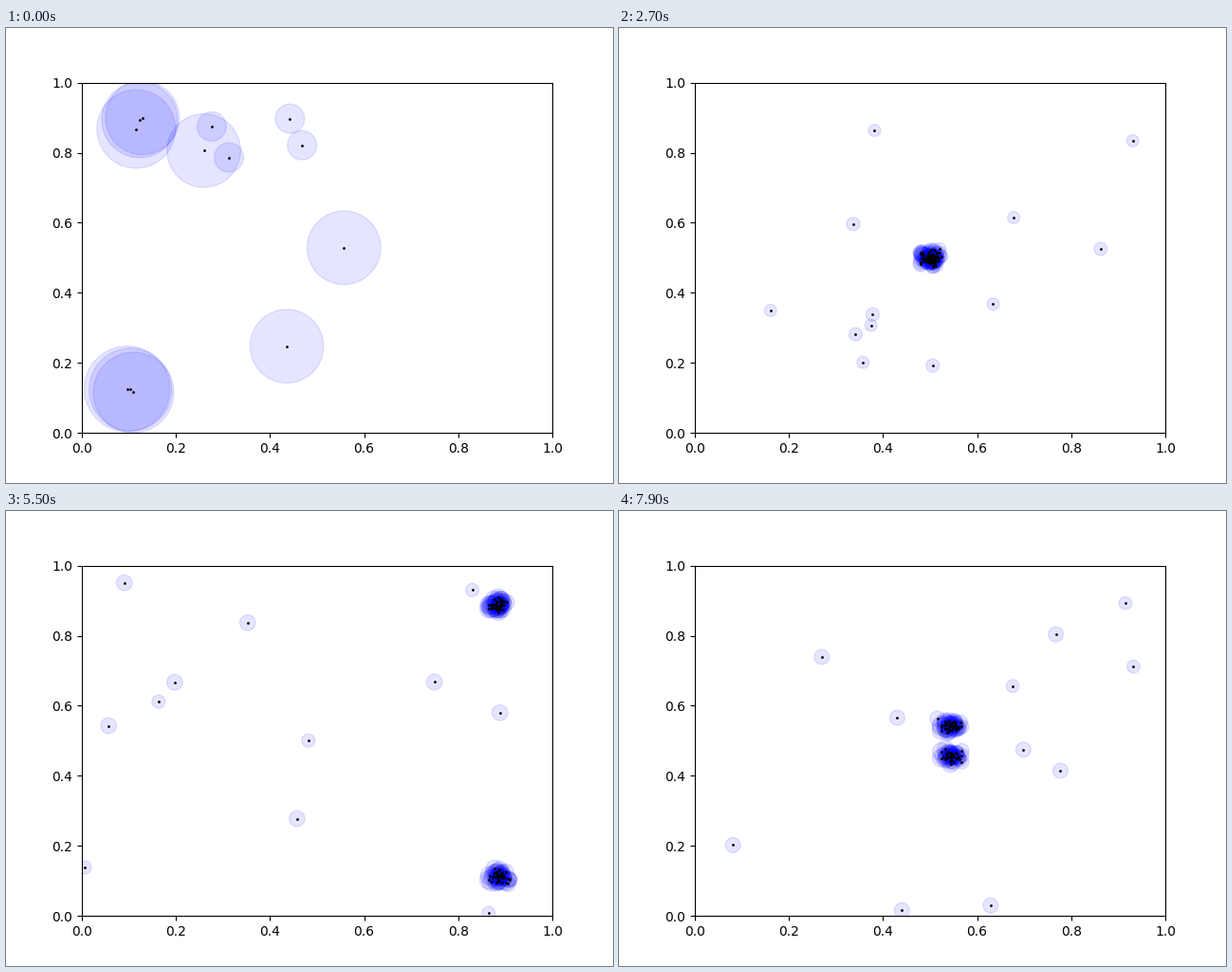
A matplotlib script for the animation above (8000 ms loop, 640 by 480 pixels).

```python
import numpy as np
import matplotlib.pyplot as plt
from matplotlib.animation import FuncAnimation

FRAMES, STEP = 80, 100
LIMIT = 100             # particles in total
BIRTHS = 13             # new particles per step
MAX_STRAYS = 12
SPREAD = 0.011
START, SPEED, TURN = 0.118, 0.01425, 54.5

fig, ax = plt.subplots(figsize=(6.4, 4.8), dpi=100)
ax.set(xlim=(0, 1), ylim=(0, 1))
halos = ax.scatter([], [], c="b", alpha=0.1, linewidths=1, zorder=1)
dots = ax.scatter([], [], s=1, c="k", linewidths=1, zorder=2)


def track(step):
    """Mean x of both tracks: steady speed, turning back near the right."""
    return START + SPEED * (TURN - abs(step - TURN))


def halo_radius(step):
    """Pixel radius: shrinks as particles fill up, swells once midway."""
    fill = 32 * np.exp(-step / 4)
    swell = 13.5 * np.exp(-((step - 47) / 2) ** 2)
    return 8.8 + 0.8 * np.cos(step / 3) + fill + swell


def strays(count, radius, rng):
    """Clutter over the unit square, strong or weak, as x, y, radius."""
    sizes = rng.choice([0.95 * radius, 2.5 * np.sqrt(radius)], count)
    return np.column_stack([rng.random((count, 2)), sizes])


def cluster(center, count, radius, rng):
    """Particles around a target; those lagging on the left are larger."""
    offset = np.clip(rng.normal(size=(count, 2)), -2, 2)
    sizes = radius * (1 - 0.05 * offset[:, 0])
    return np.column_stack([center + SPREAD * offset, sizes])


def update(step):
    rng = np.random.default_rng(500 + step)
    x, radius = track(step), halo_radius(step)
    stray_count = min(MAX_STRAYS, 7 + 5 * step)
    total = min(LIMIT, BIRTHS * (step + 1))
    count = (total - stray_count) // 2
    data = np.vstack([
        strays(stray_count, radius, rng),
        cluster((x, x), count, radius, rng),
        cluster((x, 1 - x), count, radius, rng),
    ])
    halos.set_offsets(data[:, :2])
    # Marker area in square points from the pixel radius inside the outline
    halos.set_sizes((1.44 * (data[:, 2] - 0.7)) ** 2)
    dots.set_offsets(data[:, :2])
    return halos, dots


anim = FuncAnimation(fig, update, frames=FRAMES, interval=STEP,
                     repeat=True, repeat_delay=0)
plt.show()
```
